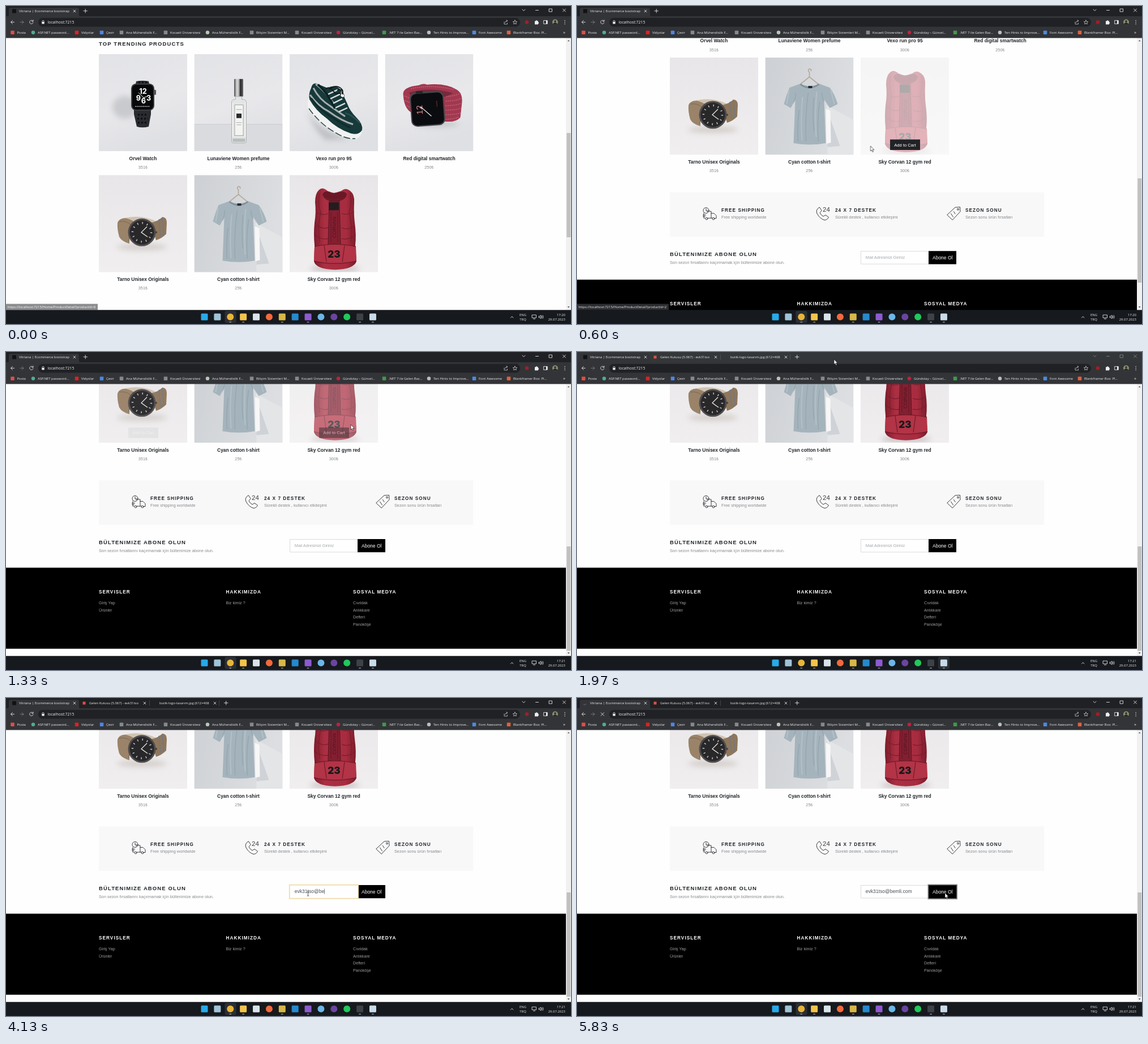
Animation of 998x561 px, one loop 5.86 s. Source, as an HTML page:

```html
<!DOCTYPE html>
<html lang="tr">
<head>
<meta charset="utf-8">
<title>Shop page</title>
<style>
@property --hover { syntax: "<number>"; inherits: true; initial-value: 0; }
html, body { margin: 0; width: 100%; height: 100%; overflow: hidden; background: #fefefe; }
svg { display: block; }
text { white-space: pre; }
.site { font: 7.3px "Liberation Sans", Arial, sans-serif; fill: #868a8e; }
.ui { font: 5.95px "Open Sans", "Noto Sans", sans-serif; fill: #eeeff1; }
.mid { text-anchor: middle; }
.end { text-anchor: end; }
.h2 { font-weight: 700; font-size: 9.5px; letter-spacing: 1.12px; fill: #212529; }
.h3 { font-weight: 700; font-size: 8.2px; letter-spacing: 1.06px; fill: #212529; }
.name { font-weight: 700; font-size: 8.44px; fill: #212529; }
.foot { font-size: 7.15px; fill: #9a9da0; }
.line { fill: none; stroke: #25282b; stroke-width: .9; stroke-linecap: round; stroke-linejoin: round; }
.glyph { fill: none; stroke: #dfe1e5; stroke-width: .9; stroke-linecap: round; stroke-linejoin: round; }
.soft { filter: blur(5px); }

#page, #thumb, #cursor, .hot, .warm { animation: 5860ms linear infinite; }
#page { animation-name: scroll; animation-timing-function: ease-out; }
#thumb { animation-name: thumb; animation-timing-function: ease-out; }
#cursor { animation-name: point; animation-timing-function: ease-in-out; }
.hot { animation-name: hot; }
.warm { animation-name: warm; }
.art { opacity: calc(1 - .63 * var(--hover)); }
.buy { opacity: var(--hover); }
#spin { animation: spin 700ms linear infinite; transform-origin: 13px 8.5px; }

@keyframes scroll {
  0%, 1.5% { transform: translateY(309.5px); }
  3.4% { transform: translateY(257.5px); }
  5.2% { transform: translateY(205.5px); }
  7% { transform: translateY(153.5px); }
  9%, 12% { transform: translateY(102.2px); }
  14.5% { transform: translateY(50px); }
  17.5%, 100% { transform: none; }
}
@keyframes thumb {
  0%, 1.5% { transform: translateY(-119px); }
  3.4% { transform: translateY(-99px); }
  5.2% { transform: translateY(-79px); }
  7% { transform: translateY(-59px); }
  9%, 12% { transform: translateY(-39px); }
  14.5% { transform: translateY(-19px); }
  17.5%, 100% { transform: none; }
}
@keyframes point {
  0%, 1.5% { transform: translate(590px, 151px); }
  10%, 13% { transform: translate(518.5px, 247px); }
  18.5% { transform: translate(240px, 122px); }
  20.5% { transform: translate(250px, 116px); }
  22.6%, 23.2% { transform: translate(609px, 128px); }
  32%, 39% { transform: translate(454px, 13px); }
  45.5%, 84% { transform: translate(533.5px, 341.5px); }
  93%, 100% { transform: translate(650px, 344px); }
}
@keyframes hot {
  0%, 6% { --hover: 0; }
  8.5%, 12.5% { --hover: 1; }
  14.5%, 21.5% { --hover: 0; }
  22.7% { --hover: .45; }
  23.4% { --hover: .5; }
  25.5%, 100% { --hover: 0; }
}
@keyframes warm {
  0%, 16.5% { --hover: 0; }
  18.5%, 20.8% { --hover: .9; }
  22.7% { --hover: .05; }
  23%, 100% { --hover: 0; }
}
@keyframes spin { to { transform: rotate(360deg); } }
</style>
</head>
<body>
<svg width="998" height="561" viewBox="0 0 998 561">
  <defs>
    <linearGradient id="studio" x2=".3" y2="1">
      <stop offset="0" stop-color="#e2e3e6"/><stop offset=".6" stop-color="#e8e8eb"/><stop offset="1" stop-color="#dfe0e3"/>
    </linearGradient>
    <linearGradient id="pale" y2="1" x2="0">
      <stop offset="0" stop-color="#e8e6e8"/><stop offset="1" stop-color="#f0eeef"/>
    </linearGradient>
    <linearGradient id="wall" x2="1" y2=".3">
      <stop offset="0" stop-color="#cdd0d4"/><stop offset="1" stop-color="#dcdee1"/>
    </linearGradient>
    <linearGradient id="metal">
      <stop offset="0" stop-color="#4a4a4c"/><stop offset=".3" stop-color="#d9d9da"/><stop offset=".5" stop-color="#bbb"/>
      <stop offset=".7" stop-color="#242426"/><stop offset="1" stop-color="#6b6c6e"/>
    </linearGradient>
    <linearGradient id="leather">
      <stop offset="0" stop-color="#7d1c2b"/><stop offset=".25" stop-color="#ab2f42"/><stop offset=".75" stop-color="#a82c3f"/><stop offset="1" stop-color="#7a1b2a"/>
    </linearGradient>
    <clipPath id="view"><path d="M0 56.5h989v480H0z"/></clipPath>
    <clipPath id="frame"><path d="M0 0h156v171.3H0z"/></clipPath>

    <g id="sport">
      <path d="M0 0h156v172H0z" fill="url(#studio)"/>
      <ellipse class="soft" cx="46" cy="94" rx="22" ry="20" fill="#c9cacd"/>
      <path d="M66 48q11-2 22 0l4 20v38l-4 22q-11 3-21 0l-5-22V68z" fill="#2a2b30"/>
      <path d="M69 107h18M68 114h19M69 121h18M70 50h16" stroke="#0c0d0f" stroke-width="3" stroke-dasharray="3 3"/>
      <rect x="57" y="52" width="41" height="48" rx="9" fill="#3d3e42"/>
      <rect x="59" y="54" width="37" height="44" rx="7" fill="#070809"/>
      <rect x="97.500" y="63" width="3.500" height="9" rx="1.500" fill="#55565a"/>
      <g font-family="Inter, sans-serif" font-weight="800" font-size="12.500" fill="#f4f4f4" text-anchor="middle">
        <text x="78" y="70">12</text><text x="70" y="82">9</text><text x="88" y="82">3</text><text x="79" y="87">6</text>
      </g>
      <path d="M70 68l9 9 6-2" stroke="#fff" fill="none"/><path d="M64 92.500h26" stroke="#aaa" stroke-width="1.400" stroke-dasharray="2 .8"/>
    </g>
    <g id="bottle">
      <path d="M0 0h156v172H0z" fill="url(#studio)"/>
      <path d="M0 124h156v48H0z" fill="#dadbde"/><path d="M0 124h156" stroke="#cbccd0"/>
      <rect x="70.500" y="44" width="16" height="31" rx="1" fill="url(#metal)"/>
      <path d="M73 75h11v5q7 0 8 4v70q0 3-3 3H69q-3 0-3-3V84q1-4 7-4z" fill="#e3e5e5" stroke="#a2a6a6" stroke-width=".8"/>
      <path d="M68 86v60M90 86v60" stroke="#f8f8f8"/><path d="M68 149h22v6H68z" fill="#b9bebd"/>
      <rect x="71.500" y="90" width="15" height="54" fill="#f4f4f3" stroke="#777" stroke-width=".6"/>
      <path d="M74.500 105h9v8h-9z" fill="#292a2d"/><path d="M74 98h10M74 121h10M75 125h8" stroke="#888" stroke-width=".7"/>
    </g>
    <g id="runner">
      <path d="M0 0h156v172H0z" fill="url(#studio)"/>
      <path class="soft" d="M30 96q14 36 74 54l-40 2q-24-20-34-56z" fill="#bfc0c4"/>
      <path d="M33 78q-3 14 1 20 20 26 46 40 20 13 36 12 12-4 12-18L66 100z" fill="#f1f2f2"/>
      <path d="M34 96q20 28 46 42 20 13 36 11" fill="none" stroke="#27403f" stroke-width="1.500" stroke-dasharray="12 4"/>
      <path d="M38 60q2-9 9-8l20 8q14-8 24 4l11 24q4 12 16 24 12 12 10 22-6 10-20 6-24-8-42-26-20-14-31-34-2-10 3-20z" fill="#17393a"/>
      <path d="M36 72q14 20 34 30 22 16 42 22M42 60q10 20 30 32 14 10 26 18M46 53q16 12 32 34" fill="none" stroke="#a7adad" stroke-width="3"/>
      <path d="M50 54q17 14 30 42" fill="none" stroke="#0b2324" stroke-width="4"/>
      <path d="M38 78q18 24 38 34 20 14 32 18" fill="none" stroke="#0f2c2d" stroke-width="3"/>
      <path d="M68 71l17-8M72 79l17-8M77 87l16-8M81 95l17-8M87 102l15-7" stroke="#d8dcdc" stroke-width="2.500"/>
      <path d="M70 62q12-9 21-1t-10 9q-12-16-17-8M84 64q12-5 10 11" fill="none" stroke="#11191a" stroke-width="1.700"/>
      <path d="M98 104q14 4 26 18" fill="none" stroke="#2f5555" stroke-width="2"/>
    </g>
    <g id="band">
      <path d="M0 0h156v172H0z" fill="url(#studio)"/>
      <ellipse class="soft" cx="92" cy="124" rx="38" ry="5" fill="#c3c4c8"/>
      <path d="M32 70q0-12 28-15 8-4 14-1 34-3 53 9 10 6 9 22l-3 27q-8 9-27 7l-60-16q-13-8-14-33z" fill="#a23850"/>
      <path d="M42 68q38-11 78 1l-12 6-60 2z" fill="#762a3c"/>
      <path d="M108 75q16-1 26-6M107 83q18 0 28-5M107 91q18 0 28-4M107 99q16 0 27-3M107 107q16 0 26-3M107 115q14 0 24-4M46 61q38-8 76 2M34 74l10 4M35 82l10 4M38 91l8 4" stroke="#c06578" fill="none" stroke-dasharray="2 1.500" stroke-width="1.500"/>
      <g transform="rotate(-4 76 96)">
        <rect x="45" y="66" width="60" height="61" rx="11" fill="#45464b"/><rect x="47" y="69" width="56" height="56" rx="9" fill="#0b0c0f"/>
        <rect x="56" y="64.500" width="13" height="4" rx="2" fill="#252629"/>
        <text transform="translate(66 106) rotate(-90)" font-size="15" fill="#dc858b">12</text>
        <path d="M63 92l18 18M67 96l-5-4" stroke="#eee" stroke-width="1.300"/><path d="M92 84v10" stroke="#a34a50" stroke-dasharray="2 1"/>
      </g>
    </g>
    <g id="classic">
      <path d="M0 0h156v172H0z" fill="url(#pale)"/>
      <ellipse class="soft" cx="76" cy="127" rx="44" ry="6" fill="#d3cecb"/>
      <path d="M40 77q34-9 62 5l-6 6q-26-12-52-5z" fill="#d0c3b2"/>
      <path d="M33 84q3-8 14-8 10 2 18 8l-11 18v19q-14-4-18-12-4-14-3-25z" fill="#9a8369"/>
      <path d="M36 82q12-2 20 5l-3 30" fill="none" stroke="#7b6750"/>
      <path d="M92 84q14-3 20-10 8 0 8 10l-1 20q-8 8-18 11z" fill="#8f775c"/>
      <path d="M106 79l6-2 3 27-6 3z" fill="none" stroke="#77777a" stroke-width="1.800"/>
      <circle cx="76" cy="101" r="24.500" fill="#504c4d"/><circle cx="76" cy="101" r="21.500" fill="#28282b"/>
      <circle cx="76" cy="101" r="16.500" fill="none" stroke="#c9c5bb" stroke-width="3.500" stroke-dasharray="1.500 7.140"/>
      <path d="M85 91L75 101l11 8" fill="none" stroke="#eee8dc" stroke-width="1.300"/><circle cx="101" cy="101" r="2" fill="#444"/>
    </g>
    <g id="shirt">
      <path d="M0 0h156v172H0z" fill="url(#wall)"/>
      <path d="M108 84l48 26v62h-46z" fill="#e4e5e7"/><path d="M108 88l24 68-22 2z" fill="#cfd2d6"/><path d="M107 90l8 4 1 56-8 2z" fill="#f7f7f7"/>
      <path d="M78 34V26q-4-4 0-6 4 0 3 4M62 47l16-13 16 13" fill="none" stroke="#b6a898" stroke-width="1.700"/>
      <path d="M62 46q16 8 33 0l19 7q9 12 14 29l-14 7-10-15 3 77q-28 5-57 0l3-76-8 14-12-7q5-18 10-29z" fill="#a5b4bc"/>
      <path d="M50 80q4-10 4-18M104 78q-4-8-4-16M60 92q-4 26-2 56M76 62q-6 40-4 86M96 78q-5 34-2 70M86 70q-3 30 0 60" stroke="#8799a3" stroke-width="1.500" fill="none" opacity=".5"/>
      <path d="M66 70q-4 40-1 76M91 60q-4 40-1 80M42 58l-4 24M116 58l6 24" stroke="#bac6cc" stroke-width="2" fill="none" opacity=".7"/>
      <path d="M62 47q16 12 33 0" fill="none" stroke="#7f9099" stroke-width="2.500"/><path d="M76 50h7v4h-7z" fill="#25282c"/>
    </g>
    <g id="hightop">
      <path d="M0 0h156v172H0z" fill="url(#pale)"/>
      <ellipse class="soft" cx="80" cy="165" rx="44" ry="4" fill="#bdb3b6"/>
      <path d="M45 48q0-16 7-22 6-6 15 2l11 4 13-4q8-7 16 0 8 6 7 20-1 20 1 36 3 22 1 40l2 28q-4 14-38 15-34-1-37-15l1-28q-2-20 0-40 3-18 1-36z" fill="url(#leather)"/>
      <path d="M58 34q4-8 12-4 8 3 18 0 10-3 13 4-2 12-22 13-18-1-21-13z" fill="#6b1826"/>
      <path d="M62 40q16 9 36 0M48 66q10 6 20 2M92 68q10 3 22-3M47 88q12 9 22 4M92 93q12 5 23-4M45 106q12 9 24 6M92 112q12 3 24-6M53 32q-4 20 2 34-6 22-2 52M107 32q3 18-2 34 6 22 3 52" fill="none" stroke="#7a1c2c" stroke-width="1.200"/>
      <path d="M70 46h18l2 76H68z" fill="#831f30" stroke="#551421" stroke-width=".9"/>
      <path d="M69 48h18v14H69z" fill="#241c20"/>
      <path d="M73 66v52M85 66v52" stroke="#5c1523" stroke-width=".8"/>
      <text transform="translate(82 111) rotate(-90)" font-size="9" fill="#521422">CORVAN</text>
      <path d="M44 126q35-8 73 0l1 25q-37 8-75 0z" fill="#b23446"/>
      <path d="M44 126q35-8 73 0M61 124l4 29M97 124l-4 29M43 152q36 8 75 0" fill="none" stroke="#741a2a" stroke-width="1.200"/>
      <text x="78.500" y="145.500" font-family="Inter, sans-serif" font-size="17" font-weight="900" fill="#1c181b" text-anchor="middle">23</text>
    </g>
  </defs>

  <path d="M0 56h998v480H0z" fill="#fefefe"/>
  <g clip-path="url(#view)">
    <g id="page" class="site">
      <text class="h2" x="164" y="-240">TOP TRENDING PRODUCTS</text>
      <g id="cards"></g>

      <path d="M164 226.500h661v78.500H164z" fill="#f8f8f9"/>
      <g class="line">
        <path d="M230 261v-1h7v12h-6M224 263v9h2M237 263.500h5l4 4v5h-3M237 272h2"/>
        <path d="M222.500 266.500h5M222.500 269h4"/>
        <circle cx="228" cy="258.500" r="5"/><path d="M228 255.500v3.500h3"/><circle cx="229" cy="273" r="1.900"/><circle cx="241" cy="273" r="1.900"/>
        <path d="M428 253q-7 4-4 11 5 9 13 11.500 5 0 7.500-5l-5.500-4-4 2.500q-4-2-6-6.500l3-3.500z"/>
        <path d="M654 266l14-13 8.500-.5.5 8-13.500 14.500z"/><circle cx="673" cy="256.500" r="1.500"/><path d="M660.500 264l4 6M665.500 260.500l2.500 4"/>
      </g>
      <text x="434" y="260.500" font-size="11.500" fill="#3a3d40">24</text>
      <text class="h3" x="255" y="261">FREE SHIPPING</text><text x="255" y="273" font-size="7.400">Free shipping worldwide</text>
      <text class="h3" x="456" y="261">24 X 7 DESTEK</text><text x="456" y="273">Sürekli destek , kullanıcı etkileşimi</text>
      <text class="h3" x="686" y="261">SEZON SONU</text><text x="686" y="273">Sezon sonu ürün fırsatları</text>

      <text class="h2" x="164" y="338.700">BÜLTENIMIZE ABONE OLUN</text>
      <text x="164" y="353.200">Son sezon fırsatlarını kaçırmamak için bültenimize abone olun.</text>
      <path d="M501.500 330.500h120v22.500h-120z" fill="#fff" stroke="#ced2d8" stroke-width=".8"/>
      <path d="M621 330h49v23.300h-49z" fill="#000"/>
      <path data-on="2680,5610" d="M500.800 329.700h121.200v24h-121.200z" fill="#fff" stroke="#efdfb4" stroke-width="2"/>
      <text id="hint" x="509.800" y="344" fill="#a3a7ab">Mail Adresinizi Giriniz</text>
      <text id="mail" x="509.800" y="344" font-size="8.550" fill="#495057"></text>
      <path id="caret" data-on="2680,5610" d="M510.200 336.500v9.500" stroke="#333" stroke-width=".6"/>
      <path data-on="5610,5860" d="M620.300 329.300h50.900v25h-50.900z" fill="#000" stroke="#8b8b8d" stroke-width="1.700"/>
      <text x="628" y="344.500" font-size="8.500" fill="#fff">Abone Ol</text>

      <path d="M0 380.500h989v143H0z" fill="#000"/>
      <g id="footer" class="foot"></g>
    </g>
  </g>

  <g class="ui">
    <path d="M989 56.500h9v480h-9z" fill="#f1f1f1"/>
    <path id="thumb" d="M990.300 343h7v184h-7z" fill="#c1c1c1"/>
    <path d="M991.800 62.300l1.900-2.400 1.900 2.400zM991.800 530l1.900 2.400 1.900-2.400z" fill="#555"/>
    <g data-on="0,330" opacity=".55"><path d="M0 525.500h162v11H0z" fill="#2c2e31"/><text x="2.500" y="533.200" fill="#fff">https://localhost:7215/Home/ProductDetail?productId=8</text></g>
    <g data-on="380,950"><path d="M0 525.500h162v11H0z" fill="#2c2e31"/><text x="2.500" y="533.200">https://localhost:7215/Home/ProductDetail?productId=2</text></g>

    <path d="M0 0h998v18H0z" fill="#202124"/>
    <path data-on="1900,2500" d="M0 0h998v18H0z" fill="#34373a"/>
    <path d="M2 18.500q3 0 3-3V6q0-3 3-3h118q3 0 3 3v9.500q0 3 3 3z" fill="#333438"/>
    <path d="M0 18h998v38.500H0z" fill="#333438"/>
    <path data-on="0,5640" d="M11 5.500h7v7h-7z" fill="#111214"/>
    <path id="spin" data-on="5640,5860" d="M13 5a3.500 3.500 0 0 1 3.500 3.500" fill="none" stroke="#587199"/>
    <text x="23" y="10.800">Vitriana | Ecommerce bootstrap</text>
    <path d="M113 3h4v13h-4z" fill="#333438"/>
    <path class="glyph" d="M119 7l4 4m0-4l-4 4"/>
    <path class="glyph" data-on="0,1900" d="M137 8.700h6.500m-3.250-3.250v6.500"/>
    <g data-on="1900,5860">
      <path d="M135.500 6.500h5v5h-5z" fill="#dd5045"/>
      <text x="147" y="10.800">Gelen Kutusu (5.067) - evk31tso</text>
      <text x="271" y="10.800">butik-logo-tasarım.jpg (612×408</text>
      <path class="glyph" d="M243 7l4 4m0-4l-4 4M367 7l4 4m0-4l-4 4M385.500 8.700h6.500m-3.250-3.250v6.500"/>
      <path d="M253.500 4v10M376.500 4v10" stroke="#5b5e63" stroke-width=".6"/>
    </g>
    <g class="glyph">
      <path id="controls" d="M912 6l2.500 2.500L917 6M935.500 7.500h5M959.500 5h5v5h-5zM983.500 5l5 5m0-5l-5 5"/>
      <path data-on="1900,2500" d="M908 7.500h84" stroke="#34373a" stroke-width="9" opacity=".55"/>
    </g>

    <rect x="57" y="21" width="851" height="15.500" rx="7.700" fill="#202124"/>
    <g class="glyph">
      <path d="M14.500 28.500h-6m3-3l-3 3 3 3"/><path opacity=".4" d="M25 28.500h6m-3-3l3 3-3 3"/>
      <path data-on="0,5640" d="M47.300 26.200a3.200 3.200 0 1 0 .7 3M48 24.700v2.500h-2.500"/>
      <path data-on="5640,5860" d="M42.300 25.800l5.400 5.400m0-5.400l-5.400 5.400"/>
      <path d="M64 28v-1a1.500 1.500 0 0 1 3 0v1"/>
      <path stroke-width=".7" d="M880 28v4h5.500v-2M881.500 29q1-3 4-3m-1.500-1.500l1.800 1.500-1.800 1.500"/>
      <path stroke-width=".7" d="M899 25l1.100 2.400 2.600.3-2 1.700.6 2.600-2.300-1.400-2.300 1.400.6-2.600-2-1.700 2.600-.3z"/>
      <path d="M950 25.500h6v6h-6z"/>
    </g>
    <path d="M63.300 28h4.400v3.500h-4.400zM954 25.500h2.500v6H954z"/>
    <text x="73.500" y="31" font-size="6.970">localhost:7215</text>
    <rect x="917" y="25.500" width="6" height="6" rx="1" fill="#a51d22"/>
    <path d="M934 26.500h2a1.200 1.200 0 0 1 2.400 0h1.600v2a1.200 1.200 0 0 1 0 2.400v1.600h-6z"/>
    <circle cx="970" cy="28.500" r="5" fill="#84906e"/><path d="M966 31.500q4-5 8 0-4 4-8 0z" fill="#25282a"/><circle cx="970" cy="27" r="1.800" fill="#25282a"/>
    <path d="M986.500 25h1.200v1.200h-1.200zm0 3h1.200v1.200h-1.200zm0 3h1.200v1.200h-1.200z"/>
    <g id="marks"></g>
    <text x="984" y="49" font-size="8">»</text>

    <path d="M0 536.300h998V561H0z" fill="#16191d"/>
    <rect data-on="0,1900" x="386.500" y="538" width="20" height="21" rx="2.500" fill="#2b2f34"/>
    <rect data-on="1900,2500" x="638" y="538" width="20" height="21" rx="2.500" fill="#2b2f34"/>
    <rect data-on="2500,5860" x="386.500" y="538" width="20" height="21" rx="2.500" fill="#2b2f34"/>
    <g id="apps"></g>
    <g class="glyph">
      <path d="M891.500 550l2.200-2.300 2.200 2.300M929.500 545h7v5h-7zM931.500 552h3"/>
      <path d="M941.500 547.300h1.500l2-1.800v6l-2-1.800h-1.500zM946.500 547q1 1.500 0 3M948.200 545.700q2 2.800 0 5.600"/>
    </g>
    <text class="mid" x="913" y="547.200">ENG</text><text class="mid" x="913" y="555.200">TRQ</text>
    <text class="end" data-on="0,1000" x="988" y="547.200">17:20</text><text class="end" data-on="1000,5860" x="988" y="547.200">17:21</text>
    <text class="end" x="988" y="555.200">29.07.2023</text>
  </g>

  <g id="cursor" stroke="#000" stroke-width=".6" stroke-linejoin="round">
    <path data-on="0,330" fill="#fff" d="M1 0q1-1 2 0v4l4 1q1 1 .5 3L6.500 10H3L0 6q0-1 1.500 0z"/>
    <path data-on="330,2610" fill="#fff" d="M0 0v9l2-1.900L3.500 10.500l1.500-.7-1.500-3.200h2.800z"/>
    <path data-on="2610,5270" fill="none" stroke="#222" stroke-width=".8" d="M-1.500 0h3M0 0v7.500M-1.500 7.500h3"/>
    <path data-on="5270,5860" fill="#fff" d="M0 0v9l2-1.900L3.500 10.500l1.500-.7-1.500-3.200h2.800z"/>
  </g>
</svg>
<script>
const LOOP = 5860;
const ADDRESS = "evk31tso@bemli.com";
const FIRST_KEY = 3010, KEY_GAP = 105;
const $ = id => document.getElementById(id);

const products = [
  ["sport", "Orvel Watch", 351], ["bottle", "Lunaviene Women prefume", 25],
  ["runner", "Vexo run pro 95", 300], ["band", "Red digital smartwatch", 250],
  ["classic", "Tarno Unisex Originals", 351, "warm"], ["shirt", "Cyan cotton t-shirt", 25],
  ["hightop", "Sky Corvan 12 gym red", 300, "hot"]
];
$("cards").innerHTML = products.map(([art, name, price, state], i) => {
  const x = 164 + i % 4 * 168.5, y = i < 4 ? -224.8 : -11.2;
  const buy = `<g class="buy"><path d="M52 144.5h53v18.500H52z" fill="#212226"/>
    <text class="mid" x="78.500" y="156.500" font-size="7.600" fill="#fff">Add to Cart</text></g>`;
  return `<g transform="translate(${x} ${y})" class="${state || ""}">
    <g class="art" clip-path="url(#frame)"><use href="#${art}"/></g>${state ? buy : ""}
    <text class="mid name" x="78" y="187">${name}</text>
    <text class="mid" x="78" y="202.200">${price}₺</text></g>`;
}).join("");

const columns = [
  [164, "SERVISLER", "Giriş Yap", "Ürünler"],
  [388.5, "HAKKIMIZDA", "Biz kimiz ?"],
  [613, "SOSYAL MEDYA", "Cıvıldak", "Anlıkkare", "Defteri", "Panoköşe"]
];
$("footer").innerHTML = columns.map(([x, head, ...links]) =>
  `<text class="h3" x="${x}" y="426" style="fill:#fff">${head}</text>` +
  links.map((link, i) => `<text x="${x}" y="${445 + i * 12.5}">${link}</text>`).join("")
).join("");

function icon(x, y, size, color, round) {
  return `<rect x="${x - size / 2}" y="${y - size / 2}" width="${size}" height="${size}"
    rx="${round ? size / 2 : size / 8}" fill="${color}"/>`;
}

const bookmarks = [
  [11.5, "#dd5045", "Posta"], [48, "#4fae8c", "ASP.NET password...", 1], [125, "#e02020", "Vidyolar"],
  [169, "#4b86e8", "Çevir"], [204, "#85888c", "Ana Mühendislik F..."], [282, "#85888c", "Kocaeli Üniversitesi"],
  [356, "#b8c8b5", "Ana Mühendislik F...", 1], [434, "#85888c", "Bilişim Sistemleri M..."],
  [514, "#85888c", "Kocaeli Üniversitesi"], [587, "#c51f3d", "Gündolay – Güncel...", 1],
  [668, "#3d9a4a", ".NET 7 ile Gelen Baz..."], [747, "#b9bec6", "Ten Hints to Improve...", 1],
  [827, "#4c8be0", "Font Awesome"], [888, "#e2603a", "Blankframer Box: Pl..."]
];
$("marks").innerHTML = bookmarks.map(([x, color, label, round]) =>
  icon(x, 46.7, 6.5, color, round) + `<text x="${x + 8}" y="48.800">${label}</text>`).join("");

// color, round, running
const apps = [
  ["#27a9ea"], ["#9fc4d8"], ["#e8b53a", 1, 1], ["#f3c34b", 0, 1], ["#d9e4ea"], ["#f2693c", 1], ["#d8b746", 0, 1],
  ["#2589ce"], ["#8d5bd0", 0, 1], ["#6bb7e8", 1], ["#6a45a0", 1], ["#1fc95b", 1], ["#3d4248", 0, 1], ["#c9dbe9", 0, 1]
];
$("apps").innerHTML = apps.map(([color, round, running], i) => {
  const x = 350.5 + i * 22.88;
  return icon(x, 548.5, 12, color, round) +
    (running ? `<rect x="${x - 2}" y="557" width="4" height="1.300" rx=".6" fill="#a2a7ad"/>` : "");
}).join("");

const timed = [...document.querySelectorAll("[data-on]")].map(el => [el, ...el.dataset.on.split(",").map(Number)]);
let start, shown = -1;

function tick(now) {
  start ??= now;
  const t = (now - start) % LOOP;
  for (const [el, from, to] of timed) el.style.visibility = t >= from && t < to ? "visible" : "hidden";
  const typed = Math.max(0, Math.min(ADDRESS.length, Math.floor((t - FIRST_KEY) / KEY_GAP) + 1));
  if (typed !== shown) {
    shown = typed;
    $("mail").textContent = ADDRESS.slice(0, typed);
    $("hint").style.visibility = typed ? "hidden" : "visible";
    const width = typed ? $("mail").getComputedTextLength() : 0;
    $("caret").setAttribute("transform", `translate(${width} 0)`);
  }
  requestAnimationFrame(tick);
}
requestAnimationFrame(tick);
</script>
</body>
</html>
```
